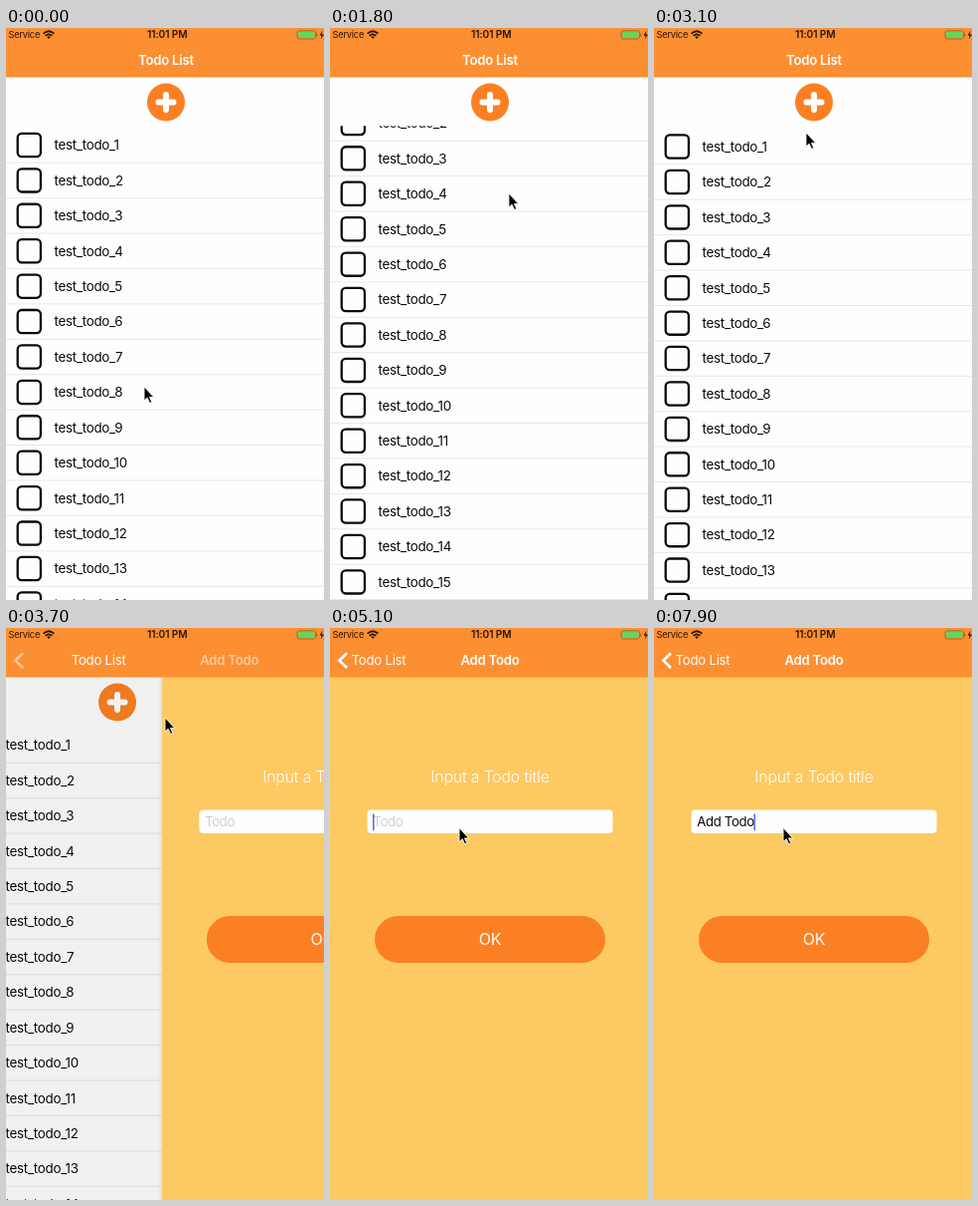
These frames come from a looping animation (320x574 px, 8000 ms). An HTML page:

```html
<!DOCTYPE html>
<html lang="en">
<head>
<meta charset="utf-8">
<title>Todo List</title>
<style>
  html, body { margin: 0; width: 100%; height: 100%; overflow: hidden; background: #fefefe; }
  svg { display: block; width: 100vw; height: 100vh; }
  text { font: 400 13.2px Inter, "Open Sans", sans-serif; letter-spacing: -.25px; white-space: pre; }
  .bold { font-weight: 600; }
  .mid { text-anchor: middle; }
  .light { font-weight: 300; }
  .status { font-size: 9.2px; letter-spacing: -.2px; fill: #2a1608; }
  .row { font-size: 13.4px; letter-spacing: -.28px; fill: #0a0a0a; }
</style>
</head>
<body>
<svg viewBox="0 0 320 574" preserveAspectRatio="none">
  <defs>
    <clipPath id="listClip"><rect y="98.3" width="320" height="476"/></clipPath>
    <linearGradient id="edge"><stop offset="0" stop-opacity="0"/><stop offset="1" stop-opacity=".06"/></linearGradient>
  </defs>
  <rect width="320" height="574" fill="#fefefe"/>

  <g id="home">
    <g clip-path="url(#listClip)"><g id="rows"></g></g>
    <circle cx="161" cy="74.5" r="19" fill="#fb8023"/>
    <path d="M161 67v15M153.5 74.5h15" stroke="#fff" stroke-width="6" stroke-linecap="round"/>
  </g>
  <rect id="dim" width="320" height="574"/>

  <g id="form">
    <rect x="-4" y="49" width="4" height="525" fill="url(#edge)"/>
    <rect y="49" width="320" height="525" fill="#fdc963"/>
    <text class="mid light" x="161" y="154.6" fill="#fff" style="font-size:15.7px;letter-spacing:-.1px">Input a Todo title</text>
    <rect x="37.5" y="182.5" width="247" height="23.5" rx="4" fill="#fefefe"/>
    <text id="hint" class="light" x="43.3" y="198.8" fill="#c4c2c8">Todo</text>
    <text id="typed" x="43.3" y="198.8" fill="#0a0a0a" style="letter-spacing:-.36px"></text>
    <rect id="caret" y="186.5" width="1.5" height="16.5" fill="#4a6be0"/>
    <rect x="45" y="289" width="232" height="47" rx="23.5" fill="#fb8023"/>
    <text class="mid" x="161" y="318.2" fill="#fff" style="font-size:16px">OK</text>
  </g>

  <rect width="320" height="49.5" fill="#fd8f33"/>
  <g fill="#fff">
    <path id="chevron" d="M17 25.2L9.4 32.6L17 40" fill="none" stroke="#fff" stroke-width="2.6"/>
    <text id="back" y="37.3">Todo List</text>
    <text id="title" class="bold" y="37.3">Todo List</text>
    <text id="formTitle" class="bold mid" y="37.3">Add Todo</text>
  </g>
  <text class="status" x="2.6" y="10.4">Service</text>
  <text class="status bold mid" x="162.3" y="10.4" style="font-size:10.2px;letter-spacing:-.1px">11:01 PM</text>
  <g fill="none" stroke="#20120a" stroke-width="1.7">
    <path d="M37.6 5.6Q43 .9 48.4 5.6M39.6 7.8Q43 4.9 46.4 7.8"/>
    <path d="M41.2 9L43 11L44.8 9Q43 7.6 41.2 9Z" fill="#20120a" stroke="none"/>
  </g>
  <rect x="293" y="2.8" width="18.6" height="8.2" rx="2" fill="none" stroke="#8a6430" stroke-width=".8"/>
  <rect x="294.2" y="4" width="16.2" height="5.8" rx="1" fill="#5fd85c"/>
  <path d="M312.8 5.5v2.8" stroke="#8a6430" stroke-width="1.1"/>
  <path d="M318.6 2.6L315.6 7.4H317.8L316.8 11.2L320 6.4H317.7Z" fill="#20120a"/>

  <g id="pointer">
    <circle id="ring" cx=".6" cy="1.5" r="22.2" fill="none" stroke="#0a0a0a" stroke-width="1.7"/>
    <path d="M0 0V14L3.2 11.2L5.6 16.4L7.8 15.4L5.5 10.4H9.8Z" fill="#000" stroke="#fff" stroke-width=".9"/>
  </g>
</svg>
<script>
const $ = id => document.getElementById(id);
const LOOP = 8000, TICK = 100;
const ROW = 35.42, COUNT = 15, VIEW = 474, MAX = ROW * COUNT - VIEW;

$('rows').innerHTML = Array.from({ length: COUNT }, (_, i) => {
  const y = 117.5 + ROW * i;
  return `<rect x="11.7" y="${y - 11.6}" width="23.2" height="23.2" rx="4.2" fill="none" stroke="#0a0a0a" stroke-width="2.3"/>
    <text class="row" x="48.5" y="${y + 4.8}">test_todo_${i + 1}</text>
    <path d="M0 ${y + ROW / 2}H320" stroke="#cfcfd6" stroke-width=".5"/>`;
}).join('');

// Pointer stops: time, x, y
const PATH = [
  [0, 139, 360], [300, 150, 362], [450, 150, 362], [1050, 178, 166],
  [1900, 180, 166], [2500, 168, 364.5], [2700, 168, 364.5], [3100, 153, 105],
  [3350, 160, 90], [4100, 160, 90], [4650, 130, 200.5]
];
const PRESSES = [[400, 1150], [1900, 2650], [3400, 3520], [4750, 4870]];
const KEYS = [5600, 5800, 6100, 6500, 6600, 6800, 7000, 7200];
const PHRASE = 'Add Todo';

const clamp = (v, a, b) => Math.max(a, Math.min(b, v));
const smooth = u => u * u * (3 - 2 * u);
// Remaining distance of a critically damped spring
const settle = (ms, rate) => {
  const k = Math.max(0, ms) / 1000 * rate;
  return (1 + k) * Math.exp(-k);
};

function pointerAt(t) {
  const i = PATH.findIndex(p => p[0] > t);
  if (i < 0) return PATH[PATH.length - 1].slice(1);
  const [t0, x0, y0] = PATH[i - 1], [t1, x1, y1] = PATH[i];
  const u = smooth((t - t0) / (t1 - t0));
  return [x0 + (x1 - x0) * u, y0 + (y1 - y0) * u];
}

function rubber(raw) {
  const inside = clamp(raw, 0, MAX), over = raw - inside;
  const pull = Math.abs(over) * .584;
  return inside + Math.sign(over) * pull * VIEW / (pull + VIEW);
}

function drag(t, start, [down, up]) {
  const at = Math.min(t, up);
  const held = rubber(start + pointerAt(down)[1] - pointerAt(at)[1]);
  const rest = clamp(held, 0, MAX);
  return rest + (held - rest) * settle(t - up, 12.7);
}

function scrollAt(t) {
  if (t < PRESSES[0][0]) return 0;
  return t < PRESSES[1][0] ? drag(t, 0, PRESSES[0]) : drag(t, MAX, PRESSES[1]);
}

function caretOn(t) {
  if (t < 4900) return false;
  const last = KEYS.filter(k => k <= t).pop() || 4900;
  return (t - last) % 700 < 400;
}

function draw(t) {
  const left = settle(t - 3600, 17.1), p = 1 - left;
  const move = (id, x, y = 0) => $(id).setAttribute('transform', `translate(${x} ${y})`);
  const fade = (id, v) => $(id).setAttribute('opacity', v);

  move('rows', 0, -scrollAt(t));
  move('home', -96 * p);
  fade('dim', .1 * p);
  move('form', 320 * left + (p > 0 ? 0 : 10));

  $('title').setAttribute('x', 133 - 111 * p);
  $('back').setAttribute('x', 21.6 + 90 * left);
  $('formTitle').setAttribute('x', 161 + 130 * left);
  fade('title', clamp(1 - 2 * p, 0, 1));
  fade('back', clamp(2 * p, 0, 1));
  fade('formTitle', p);
  fade('chevron', p);

  const typed = PHRASE.slice(0, KEYS.filter(k => k <= t).length);
  $('typed').textContent = typed;
  fade('hint', typed ? 0 : 1);
  $('caret').setAttribute('x', 43 + (typed ? $('typed').getComputedTextLength() : 0));
  fade('caret', caretOn(t) ? 1 : 0);

  move('pointer', ...pointerAt(t));
  fade('ring', PRESSES.some(([a, b]) => t >= a && t < b) ? 1 : 0);
}

const begin = performance.now();
function loop() {
  const t = (performance.now() - begin) % LOOP;
  draw(Math.floor(t / TICK) * TICK);
  requestAnimationFrame(loop);
}
loop();
</script>
</body>
</html>
```
